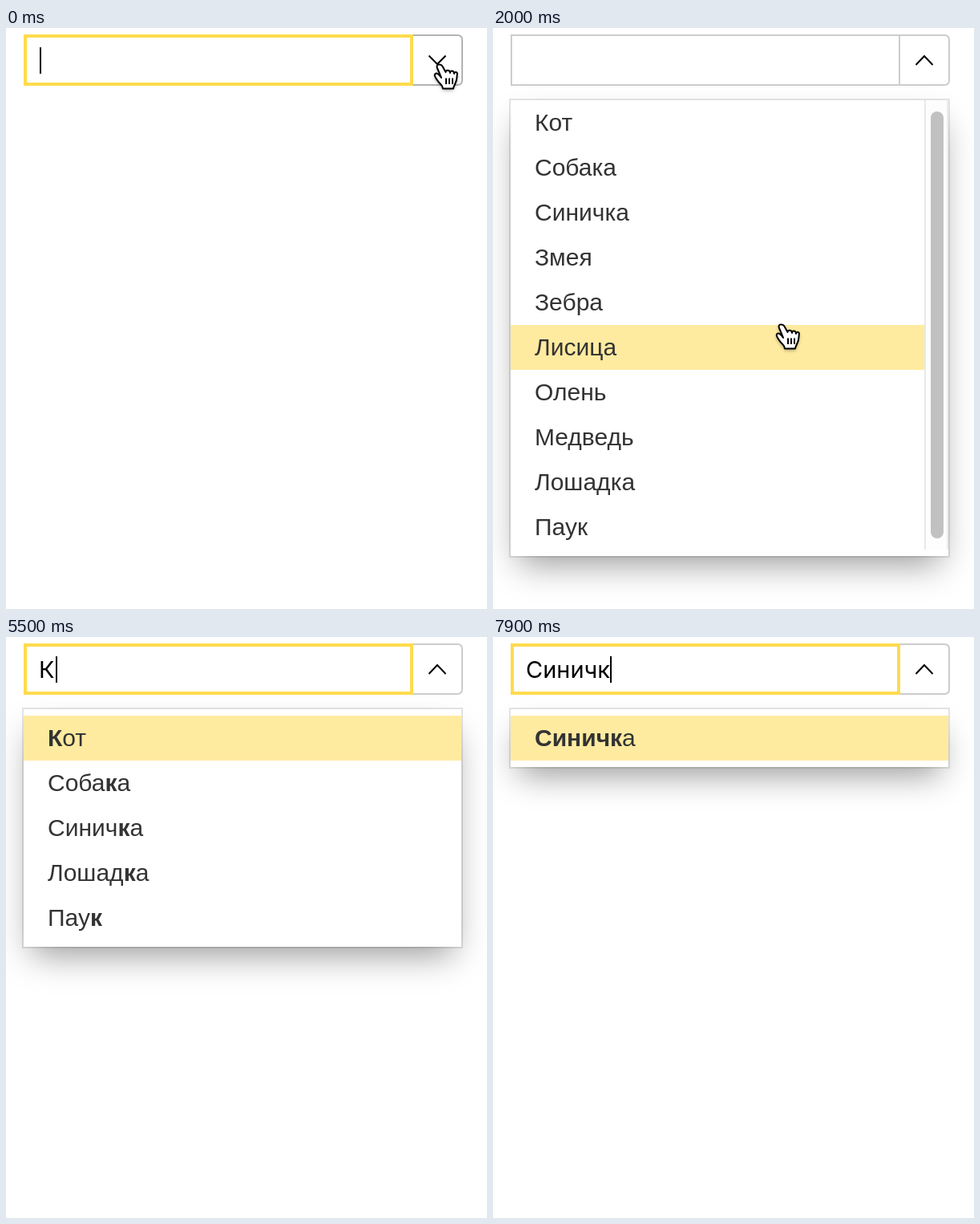
Animation, 600 px wide and 724 px high, one loop 8 s. Source, as an HTML page with a canvas:

```html
<!DOCTYPE html>
<html lang="ru">
<head>
<meta charset="utf-8">
<style>
html, body { margin: 0; width: 100%; height: 100%; overflow: hidden; background: #fff; }
canvas { display: block; }
</style>
</head>
<body>
<canvas id="stage" width="600" height="724"></canvas>
<script>
const ctx = document.getElementById('stage').getContext('2d');
const LOOP = 8000, TICK = 100, ROW = 56;
const LIST_FONT = '30px "Liberation Sans", Arial, sans-serif';
const FIELD_FONT = '29px Inter, "Liberation Sans", sans-serif';

const animals = ['Кот', 'Собака', 'Синичка', 'Змея', 'Зебра', 'Лисица', 'Олень', 'Медведь', 'Лошадка', 'Паук'];
const withK = animals.filter(a => /к/i.test(a));

// [start, field text, caret x]
const typing = [
  [0, '', 42], [2900, 'Кот', 94], [4700, 'Ко', 80],
  [5500, 'К', 62], [7000, 'Синичка', 162], [7800, 'Синичк', 146]
];
const caretOff = [[100, 4100], [4600, 4700], [5200, 5500], [6000, 6500], [7500, 7800]];

// [start, items, query, opacity]
const popups = [
  [0, null], [100, animals, '', 0.4], [200, animals, '', 0.8], [300, animals, '', 1],
  [2900, animals, '', 0.4], [3000, null],
  [4700, ['Кот'], 'Ко', 0.5], [4800, ['Кот'], 'Ко', 0.9], [4900, ['Кот'], 'Ко', 1],
  [5500, withK, 'К', 1], [7000, withK, 'К', 0.6], [7100, withK, 'К', 0.2], [7200, null],
  [7800, ['Синичка'], 'Синичк', 0.5], [7900, ['Синичка'], 'Синичк', 1]
];

// [start, x, y, kind]
const path = [
  [0, 541, 46, 'hand'], [1300, 500, 190, 'hand'], [1400, 420, 350, 'hand'], [1500, 330, 520, 'hand'],
  [1600, 283, 612, 'hand'], [1700, 288, 600, 'hand'], [1800, 302, 540, 'hand'], [1900, 330, 450, 'hand'],
  [2000, 360, 370, 'hand'], [2100, 390, 290, 'hand'], [2200, 420, 235, 'hand'], [2300, 445, 190, 'hand'],
  [2400, 465, 150, 'hand'], [2500, 474, 130, 'hand'],
  [3400, 557, 127, 'arrow'], [3500, 544, 92, 'arrow'], [3600, 524, 52, 'hand'],
  [3700, 455, 38, 'beam'], [3800, 385, 34, 'beam'], [3900, 352, 33, 'beam'], [4700, 0, 0, 'none']
];

const at = (rows, t) => rows.filter(r => r[0] <= t).pop();
const within = (t, a, b) => t >= a && t < b;

const handShape = new Path2D('M7 1.5C4.5 1.5 4 4 5 6L10 18C7 14 4.500 11.500 2.500 13C0 15 3 18 5 21C8 26 12 27 12 31.500L25 31.500C25 28 29.500 24 29.500 17C29.500 14 31 11 28 11C26 11 26 12 26 13C26 9 21 8 21 12C21 8 15.500 7.500 15.500 11L11 3C10 1.500 8.500 1.500 7 1.500Z');
const handLines = new Path2D('M16 18.500V26M20 18.500V26M24 18.500V26');
const arrowShape = new Path2D('M0 0V29L6.500 23L11 33L15.500 31L11 21H20Z');
const beamShape = new Path2D('M-7 -15Q0 -15 0 -10V9Q0 15 -7 15M7 -15Q0 -15 0 -10V9Q0 15 7 15M-4 1H4');

function fill(color, x, y, w, h) {
  ctx.fillStyle = color;
  ctx.fillRect(x, y, w, h);
}

function stroke(shape, color, width) {
  ctx.strokeStyle = color;
  ctx.lineWidth = width;
  ctx.stroke(shape);
}

function frame(color, x, y, w, h, line) {
  ctx.strokeStyle = color;
  ctx.lineWidth = line;
  ctx.strokeRect(x + line / 2, y + line / 2, w - line, h - line);
}

function drawField(t, open) {
  const focus = !within(t, 100, 4100);
  const [, text, caret] = at(typing, t);
  const button = new Path2D('M507 9H563Q569 9 569 15V65Q569 71 563 71H507');
  stroke(button, t < 1300 || t === 3600 ? '#b3b3b3' : '#ccc', 2);
  if (focus) frame('#ffdb4d', 22, 8, 486, 64, 4);
  else frame(within(t, 3700, 4100) ? '#b3b3b3' : '#ccc', 22, 8, 486, 64, 2);

  const tip = open ? 35 : 45, ends = open ? 46 : 34.5;
  stroke(new Path2D(`M527.5 ${ends}L538 ${tip}L548.5 ${ends}`), '#000', 2);

  ctx.font = FIELD_FONT;
  ctx.fillStyle = '#000';
  ctx.fillText(text, 41, 51);
  if (!caretOff.some(([a, b]) => within(t, a, b))) fill('#000', caret, 24, 2, 33);
}

function drawLabel(word, query, y) {
  const parts = query ? word.split(new RegExp(`(${query})`, 'i')) : [word];
  let x = 52;
  ctx.fillStyle = '#333';
  parts.forEach((part, i) => {
    ctx.font = (i % 2 ? 'bold ' : '') + LIST_FONT;
    ctx.fillText(part, x, y);
    x += ctx.measureText(part).width;
  });
}

function drawPopup([, items, query, opacity], active) {
  const full = items === animals;
  const height = full ? 568 : items.length * ROW + 16;
  const top = full ? 90 : 98;

  ctx.save();
  ctx.shadowColor = 'rgba(0,0,0,.4)';
  ctx.shadowBlur = 40;
  ctx.shadowOffsetX = 2000;
  fill('#000', 32 - 2000, 120, 526, height - 20);
  ctx.restore();
  fill('rgba(0,0,0,.1)', 20, 88, 550, height + 4);
  fill('#fff', 22, 90, 546, height);

  if (active >= 0) fill('#ffeba0', 22, top + active * ROW, full ? 516 : 546, ROW);
  items.forEach((word, i) => drawLabel(word, query, top + i * ROW + 38));

  if (full) {
    fill('#e8e8e8', 538, 90, 2, 560);
    fill('#fdfdfd', 540, 90, 26, 560);
    fill('#ededed', 566, 90, 2, 560);
    ctx.fillStyle = '#c1c1c1';
    ctx.beginPath();
    ctx.roundRect(546, 104, 16, 532, 8);
    ctx.fill();
  }
  if (opacity < 1) fill(`rgba(255,255,255,${1 - opacity})`, 0, 76, 600, 648);
}

function drawCursor([, x, y, kind]) {
  if (kind === 'none') return;
  ctx.save();
  ctx.lineJoin = 'round';
  if (kind === 'beam') {
    ctx.translate(x, y);
    stroke(beamShape, '#fff', 4);
    stroke(beamShape, '#000', 2);
  } else {
    const hand = kind === 'hand', shape = hand ? handShape : arrowShape;
    ctx.translate(hand ? x - 8 : x, hand ? y - 2 : y);
    ctx.save();
    ctx.shadowColor = 'rgba(0,0,0,.4)';
    ctx.shadowBlur = 4;
    ctx.shadowOffsetY = 2;
    ctx.fillStyle = hand ? '#fff' : '#000';
    ctx.fill(shape);
    ctx.restore();
    stroke(shape, hand ? '#000' : '#fff', 2);
    if (hand) stroke(handLines, '#000', 2);
  }
  ctx.restore();
}

function activeRow(t, cursor) {
  if (t < 1300) return -1;
  if (t < 3000) return Math.floor((cursor[2] - 90) / ROW);
  if (within(t, 6600, 6800)) return 1;
  return within(t, 6800, 7200) ? 2 : 0;
}

function draw(now) {
  const t = Math.floor(now % LOOP / TICK) * TICK;
  const popup = at(popups, t), cursor = at(path, t);
  const open = within(t, 100, 2900) || within(t, 4700, 7000) || t >= 7800;
  fill('#fff', 0, 0, 600, 724);
  if (popup[1]) drawPopup(popup, activeRow(t, cursor));
  drawField(t, open);
  drawCursor(cursor);
}

const start = performance.now();
function loop() {
  draw(performance.now() - start);
  requestAnimationFrame(loop);
}
loop();
</script>
</body>
</html>
```
